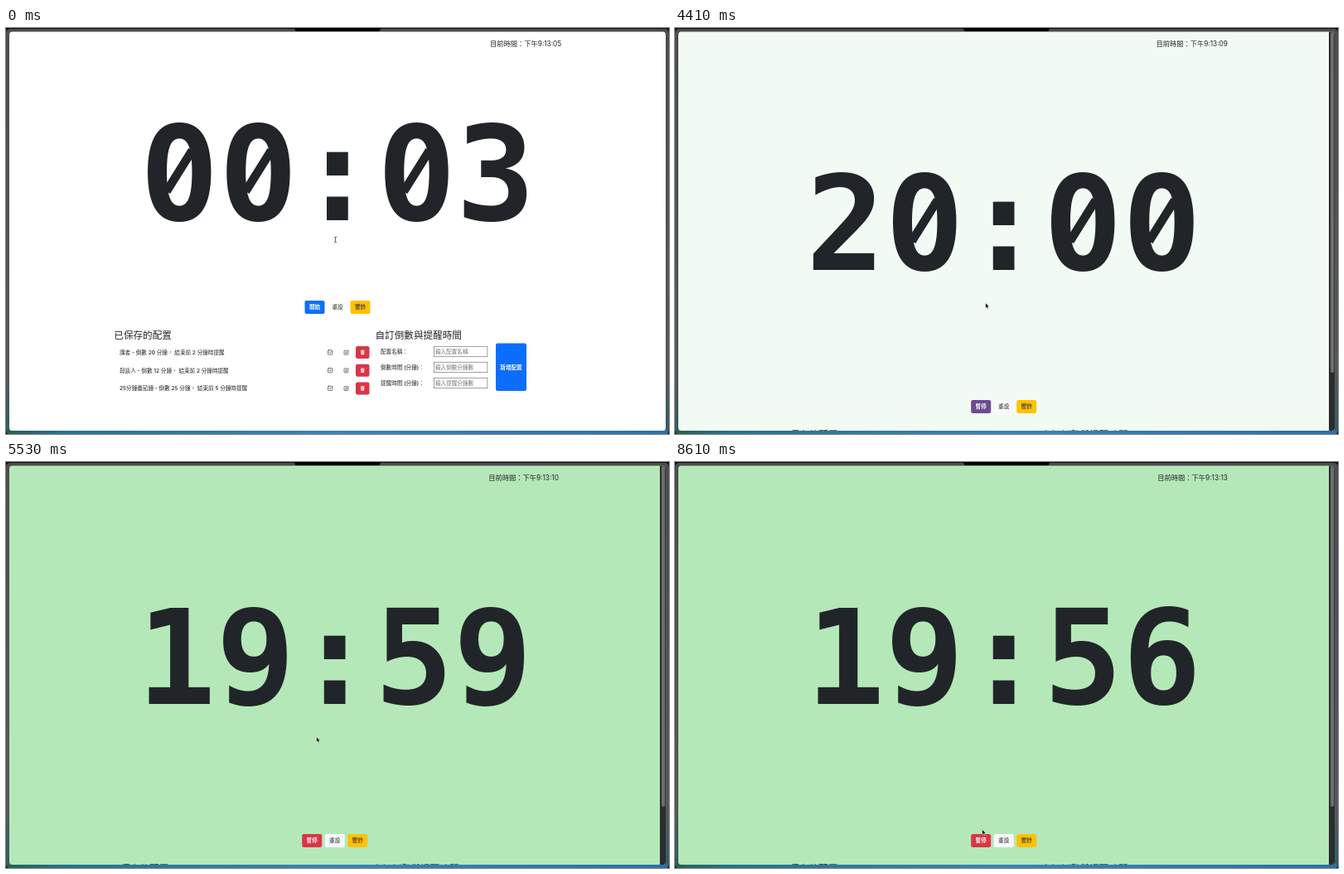
Write an HTML page that moves like this. It is 800 px wide and 490 px high and loops after 8.89 s.

```html
<!DOCTYPE html>
<html lang="zh-Hant">
<head>
<meta charset="utf-8">
<title>倒數計時</title>
<style>
  html, body { margin: 0; width: 100%; height: 100%; overflow: hidden; background: #000; }
  svg { display: block; }
  text { font: 500 6.6px Inter, "Noto Sans CJK TC", sans-serif; fill: #212529; white-space: pre; }
  .mid { text-anchor: middle; }
  .bold { font-weight: 700; }
  .white { fill: #fff; }
  .hint { fill: #757575; font-weight: 400; }
  .head { font-size: 11.6px; }
  #clock { font-size: 8.25px; font-weight: 400; text-anchor: end; }
  #digits { font: 700 158.5px "DejaVu Sans Mono", monospace; text-anchor: middle; }
  .line { fill: none; stroke: #212529; stroke-width: 1.5; stroke-linecap: round; stroke-linejoin: round; }
</style>
</head>
<body>
<svg id="stage" width="800" height="490" viewBox="0 0 800 490">
  <defs>
    <linearGradient id="desk">
      <stop offset="0" stop-color="#27604f"/>
      <stop offset=".08" stop-color="#2c6f8c"/>
      <stop offset=".5" stop-color="#3a83b4"/>
      <stop offset="1" stop-color="#2d6fa6"/>
    </linearGradient>
    <linearGradient id="side" x2="0" y2="1">
      <stop offset="0" stop-color="#4c4c4e"/>
      <stop offset=".85" stop-color="#57585a"/>
      <stop offset="1" stop-color="#2f5d66"/>
    </linearGradient>
    <clipPath id="win"><rect x="4" y="4.5" width="792" height="481.5" rx="3.5"/></clipPath>
  </defs>
  <rect width="800" height="490" fill="#111"/>
  <rect y="1" width="800" height="489" rx="5" fill="url(#side)"/>
  <rect x="1" y="485" width="798" height="5" rx="2" fill="url(#desk)"/>
  <g clip-path="url(#win)">
    <rect id="page" x="4" y="4" width="792" height="483"/>
    <text id="clock" y="22.4"></text>
    <g id="timer">
      <text id="digits" x="400" y="231.5"></text>
      <g id="zeros"></g>
    </g>
    <g id="lower"></g>
    <g id="scroll">
      <rect x="789" y="4" width="7" height="483" fill="#2b2c2e"/>
      <rect x="791" y="5" width="4.2" height="411" rx="2" fill="#6c6d70"/>
    </g>
  </g>
  <path d="M347 0H453Q451.500 .5 451.500 2Q451.500 4 449 4H351Q348.500 4 348.500 2Q348.500 .5 347 0Z" fill="#000"/>
  <g id="cursor">
    <path id="beam" d="M-1.500 -3.300Q0 -3.300 0 -2.300Q0 -3.300 1.500 -3.300M0 -2.300V2.300M-1.500 3.300Q0 3.300 0 2.300Q0 3.300 1.500 3.300" fill="none" stroke="#333" stroke-width=".8"/>
    <path id="arrow" d="M0 0V6.200L1.400 5L2.400 7.200L3.500 6.700L2.600 4.600H4.400Z" fill="#000" stroke="#fff" stroke-width=".5"/>
    <path id="hand" d="M-.7 .4Q0 -.5 .7 .4V2.600L3 3.100Q3.900 3.400 3.700 4.500L3.200 7H-.6L-2.400 4.500Q-2.600 3.600 -1.700 3.700L-.7 4.400Z" fill="#fff" stroke="#111" stroke-width=".7"/>
  </g>
</svg>
<script>
const LOOP = 8890, SELECT = 3050, START = 4340;
const $ = id => document.getElementById(id);
const rect = (x, y, w, h, fill, extra = '') =>
  `<rect x="${x}" y="${y}" width="${w}" height="${h}" fill="${fill}" ${extra}/>`;
const label = (x, y, str, cls = '', extra = '') =>
  `<text x="${x}" y="${y}" class="${cls}" ${extra}>${str}</text>`;
const icon = (x, y, body) => `<g transform="translate(${x - 3.3} ${y - 3.3}) scale(.41)">${body}</g>`;

const CHECK = '<rect class="line" x="1.500" y="1.500" width="13" height="13" rx="2"/><path class="line" d="M5 8l2.300 2.300L11 5.500"/>';
const EDIT = '<path class="line" d="M8 2.500H3Q1.500 2.500 1.500 4V13Q1.500 14.500 3 14.500H12Q13.500 14.500 13.500 13V9M6 10.500L6.600 7.800L13 1.400L15 3.400L8.600 9.900Z"/>';
const TRASH = '<path fill="#fff" d="M2 2H6L7 1H9L10 2H14V4H2ZM3 5H13L12.300 15H3.700Z"/><path d="M6 7V13M8 7V13M10 7V13" stroke="#dc3545" stroke-width=".8"/>';

const rows = [
  '講者 - 倒數 20 分鐘， 結束前 2 分鐘時提醒',
  '與談人 - 倒數 12 分鐘， 結束前 2 分鐘時提醒',
  '25分鐘番茄鐘 - 倒數 25 分鐘， 結束前 5 分鐘時提醒'];
const fields = [
  ['配置名稱：', '輸入配置名稱'],
  ['倒數時間 (分鐘)：', '輸入倒數分鐘數'],
  ['提醒時間 (分鐘)：', '輸入提醒分鐘數']];

const round = 'rx="2.200"';
let html = rect(360.5, 329, 24, 16, '#0d6efd', round + ' id="go"')
  + rect(388, 329, 24, 16, '#f8f9fa', round + ' id="reset"')
  + rect(415.5, 329, 24, 16, '#ffc107', round)
  + label(372.5, 339.4, '', 'mid bold white', 'id="goText"')
  + label(400, 339.4, '重設', 'mid')
  + label(427.5, 339.4, '響鈴', 'mid')
  + label(130.3, 374.5, '已保存的配置', 'head')
  + label(445.5, 374.5, '自訂倒數與提醒時間', 'head')
  + rect(130, 380.5, 315, 22, '#393a3b', 'id="active"');
rows.forEach((str, i) => {
  const y = 391.5 + i * 21.7;
  if (!i) html += rect(383, y - 7.5, 16, 15, '#f8f9fa', round + ' id="pick"')
    + rect(402.5, y - 7.5, 16.5, 15, '#f8f9fa', round + ' id="edit"');
  html += label(137, y + 2.4, str, '', `id="row${i}"`)
    + icon(391.2, y, CHECK) + icon(410.7, y, EDIT)
    + rect(422, y - 7.5, 16.5, 15, '#dc3545', round) + icon(430.3, y, TRASH);
});
html += `<g id="picked">${icon(391.2, 391.5, '<rect x="1" y="1" width="14" height="14" rx="2" fill="#212529"/><path d="M5 8l2.300 2.300L11 5.500" fill="none" stroke="#ddd" stroke-width="1.500"/>')}</g>`;
fields.forEach(([name, hint], i) => {
  const y = 390.5 + i * 19;
  html += label(452, y + 2.4, name)
    + rect(516.3, y - 6.2, 64.6, 12.4, '#fff', 'stroke="#767676" stroke-width=".7"')
    + label(518, y + 2.5, hint, 'hint');
});
html += rect(591, 380.5, 37, 57.5, '#0d6efd', round) + label(609.5, 411.8, '新增配置', 'mid bold white');
$('lower').innerHTML = html;

// Slashed zeros: clear the counter of the glyph and lay a bar across it
const centers = [-2, -1, 0, 1, 2].map(k => 400 + k * 95.42);
$('zeros').innerHTML = centers.map(x => `<g transform="translate(${x} 173.700)">
  <ellipse class="hole" rx="14.500" ry="39"/>
  <path d="M-15.500 23.500L15.500 -26" stroke="#212529" stroke-width="10.500"/></g>`).join('');
const zeros = [...$('zeros').children], holes = document.querySelectorAll('.hole');

const clamp = v => Math.min(1, Math.max(0, v));
const smooth = v => (v = clamp(v)) * v * (3 - 2 * v);
const bez = (a, b, u) => 3 * a * u * (1 - u) ** 2 + 3 * b * u * u * (1 - u) + u ** 3;
function ease(x) {
  x = clamp(x);
  let lo = 0, hi = 1;
  for (let i = 0; i < 20; i++) {
    const m = (lo + hi) / 2;
    bez(.25, .25, m) < x ? lo = m : hi = m;
  }
  return bez(.1, 1, lo);
}
const mix = (a, b, k) => `rgb(${a.map((v, i) => Math.round(v + (b[i] - v) * k))})`;
const show = (id, on) => $(id).style.display = on ? '' : 'none';

// [start, end, x, y]: the pointer reaches x, y at the end time
const moves = [[70, 1200, 390.5, 391.5], [3260, 3850, 374.7, 331.7], [7680, 8540, 370.7, 443.5]];
function pointer(t) {
  let x = 397.5, y = 255.5;
  for (const [a, b, tx, ty] of moves) {
    const k = smooth((t - a) / (b - a));
    x += (tx - x) * k;
    y += (ty - y) * k;
  }
  return [x, y];
}

function draw(t) {
  const chosen = t >= SELECT, running = t >= START;
  const [x, y] = pointer(t);
  const dx = running ? -3.3 : 0;

  const bg = mix([255, 255, 255], [181, 232, 184], ease((t - START) / 500));
  $('page').setAttribute('fill', bg);
  holes.forEach(h => h.setAttribute('fill', bg));

  const sec = 7 + Math.floor((t - 1680) / 1032);
  $('clock').textContent = '目前時間：下午9:13:' + String(sec).padStart(2, '0');
  $('clock').setAttribute('x', 670.2 + dx);

  const left = 1200 - Math.max(0, Math.floor((t - 5400) / 1030) + 1);
  const two = n => String(n).padStart(2, '0');
  const str = chosen ? two(Math.floor(left / 60)) + ':' + two(left % 60) : '00:03';
  $('digits').textContent = str;
  zeros.forEach((z, i) => z.style.display = str[i] === '0' ? '' : 'none');

  $('timer').setAttribute('transform', `translate(${dx} ${running ? 60 : 0})`);
  $('lower').setAttribute('transform', `translate(${dx} ${running ? 120 : 0})`);
  show('scroll', running);

  const inBox = (l, r, top, bottom) => !running && x > l && x < r && y > top && y < bottom;
  const onGo = inBox(360.5, 384.5, 329, 345), onReset = inBox(388, 412, 329, 345);
  const onPick = inBox(383, 399, 384, 399);
  $('go').setAttribute('fill', running
    ? mix([11, 94, 215], [220, 53, 69], smooth((t - START) / 150))
    : onGo ? '#0b5ed7' : '#0d6efd');
  $('goText').textContent = running ? '暫停' : '開始';
  $('reset').setAttribute('fill', onReset ? '#d3d4d5' : running ? '#f8f9fa' : '#fff');

  show('active', chosen);
  show('edit', chosen);
  show('picked', chosen);
  show('pick', chosen || onPick);
  $('pick').setAttribute('fill', onPick ? (chosen ? '#b9babb' : '#c9cacb') : '#f8f9fa');
  $('row0').setAttribute('class', chosen ? 'white' : '');
  $('row0').style.fontWeight = chosen ? 600 : 500;

  const hand = onGo || onReset || onPick, beam = !running && y < 292;
  show('hand', hand);
  show('beam', beam && !hand);
  show('arrow', !hand && !beam);
  $('cursor').setAttribute('transform', `translate(${x} ${y})`);
}

const begin = performance.now();
function frame() {
  draw((performance.now() - begin) % LOOP);
  requestAnimationFrame(frame);
}
frame();
</script>
</body>
</html>
```
